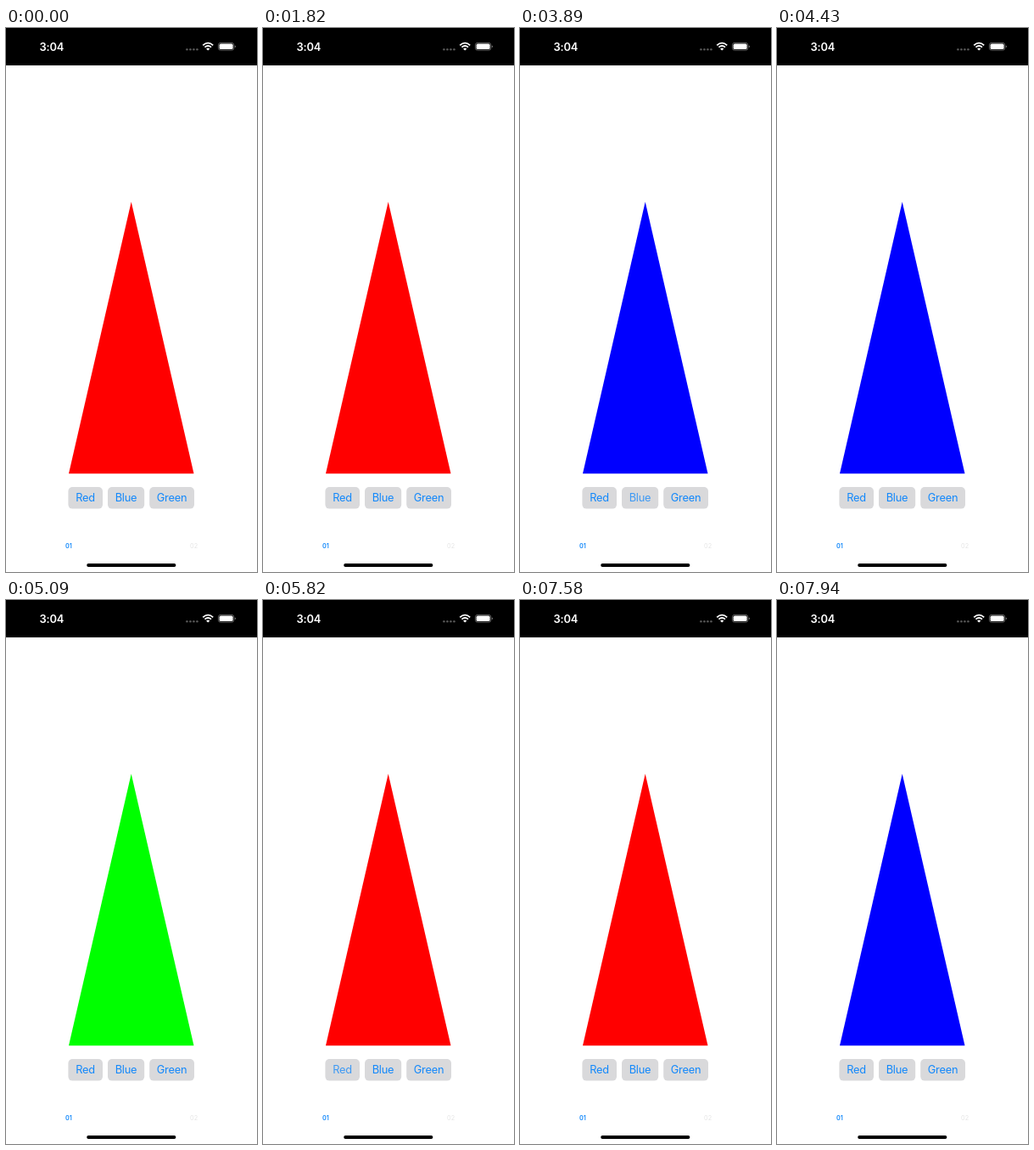
These frames come from a looping animation (296x640 px, 8 s). An HTML page:

```html
<!DOCTYPE html>
<html lang="en">
<head>
<meta charset="utf-8">
<title>Triangle colours</title>
<style>
  html, body { margin: 0; width: 100%; height: 100%; overflow: hidden; background: #fff; }
  svg { display: block; width: 296px; height: 640px; }
  text { font-family: Inter, "Open Sans", sans-serif; text-anchor: middle; }
  .label { font-size: 12.8px; letter-spacing: -.2px; fill: #1288fb; }
  .box { fill: #d9d9db; }
  .tab { font-size: 7.3px; }
</style>
</head>
<body>
<svg viewBox="0 0 296 640">
  <rect width="296" height="44" fill="#000"/>
  <text x="53.8" y="26.6" font-size="12.9" font-weight="600" letter-spacing="-.2" fill="#fff">3:04</text>
  <g fill="#555">
    <circle cx="213.4" cy="25.2" r="1.3"/>
    <circle cx="217.4" cy="25.2" r="1.3"/>
    <circle cx="221.4" cy="25.2" r="1.3"/>
    <circle cx="225.4" cy="25.2" r="1.3"/>
  </g>
  <g fill="none" stroke="#fff" stroke-width="1.8">
    <path d="M232.2 20.3Q238.2 14.9 244.2 20.3"/>
    <path d="M234.4 22.7Q238.2 19.3 242 22.7"/>
  </g>
  <path d="M236.1 24.5Q238.2 22.7 240.3 24.5L238.2 26.6Z" fill="#fff"/>
  <rect x="250.4" y="17.4" width="18.4" height="8.8" rx="2.7" fill="none" stroke="#777" stroke-width=".8"/>
  <rect x="251.6" y="18.6" width="16" height="6.4" rx="1.6" fill="#fff"/>
  <path d="M269.8 20.4q1.3 .4 1.3 1.4t-1.3 1.4z" fill="#777"/>

  <path id="triangle" d="M147.7 204.5L221.5 524.2H74Z" fill="#f00"/>

  <rect class="box" x="73.4" y="540" width="40.6" height="25.6" rx="5"/>
  <rect class="box" x="120" y="540" width="43.2" height="25.6" rx="5"/>
  <rect class="box" x="169.2" y="540" width="52.8" height="25.6" rx="5"/>
  <text class="label" x="93.6" y="557.3">Red</text>
  <text class="label" x="141.5" y="557.3">Blue</text>
  <text class="label" x="195.5" y="557.3">Green</text>

  <text class="tab" x="74" y="611.5" font-weight="600" fill="#1288fb">01</text>
  <text class="tab" x="221.6" y="611.5" fill="#e4e4e4">02</text>
  <rect x="95.2" y="630" width="105.2" height="4" rx="2" fill="#000"/>
</svg>
<script>
const LOOP = 8000;
const RED = 0, BLUE = 1, GREEN = 2, NONE = -1;
const colors = ['#f00', '#00f', '#0f0'];
// start time, triangle colour, dimmed button
const steps = [
  [0, RED, NONE],
  [3890, BLUE, BLUE],
  [4290, BLUE, NONE],
  [4820, GREEN, GREEN],
  [5090, GREEN, NONE],
  [5820, RED, RED],
  [6880, BLUE, RED],
  [7010, BLUE, NONE],
  [7120, GREEN, GREEN],
  [7230, GREEN, NONE],
  [7580, RED, NONE],
  [7830, BLUE, BLUE],
  [7940, BLUE, NONE]
];
const triangle = document.getElementById('triangle');
const labels = document.querySelectorAll('.label');

function draw(now) {
  const t = now % LOOP;
  const [, color, dimmed] = steps.filter(([start]) => start <= t).pop();
  triangle.setAttribute('fill', colors[color]);
  labels.forEach((label, i) => label.setAttribute('opacity', i === dimmed ? 0.78 : 1));
}

const begin = performance.now();
function tick() {
  draw(performance.now() - begin);
  requestAnimationFrame(tick);
}
tick();
</script>
</body>
</html>
```
